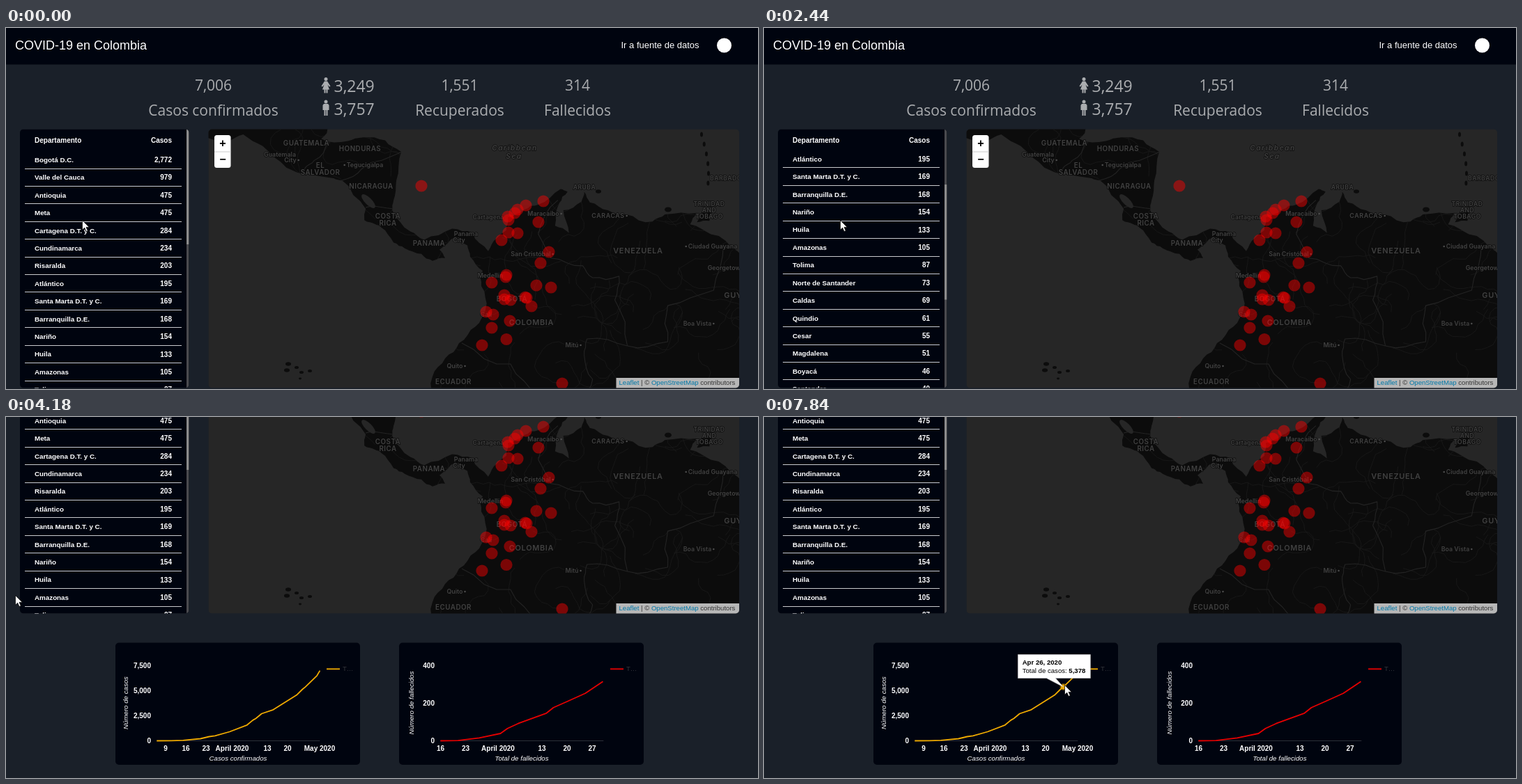
These frames come from a looping animation (1079 px wide and 519 px high, 8000 ms). An HTML page:

```html
<!DOCTYPE html>
<html lang="es">
<head>
<meta charset="utf-8">
<title>COVID-19 en Colombia</title>
<style>
  html, body { margin: 0; width: 100%; height: 100%; overflow: hidden; background: #1a2029; }
  svg { display: block; width: 1079px; height: 519px; }
  text { font-family: "Liberation Sans", Arial, sans-serif; white-space: pre; }
  .stat { font-family: "Open Sans", "Noto Sans", sans-serif; font-weight: 500; fill: #abadb0; }
  .place { font-family: Inter, Roboto, sans-serif; font-weight: 600; fill: #414141;
           stroke: #0c0c0c; stroke-width: 1.4px; paint-order: stroke; }
</style>
</head>
<body>
<svg id="stage" viewBox="0 0 1079 519"></svg>
<script>
const LOOP = 8000;
const stage = document.getElementById('stage');

function el(parent, tag, attrs = {}) {
  const node = document.createElementNS('http://www.w3.org/2000/svg', tag);
  for (const key in attrs) node.setAttribute(key, attrs[key]);
  parent.appendChild(node);
  return node;
}
const group = (parent, attrs) => el(parent, 'g', attrs);
const rect = (parent, x, y, width, height, fill, rx = 0) => el(parent, 'rect', { x, y, width, height, fill, rx });
const line = (parent, d, stroke, width = 1) =>
  el(parent, 'path', { d, fill: 'none', stroke, 'stroke-width': width, 'stroke-linejoin': 'round' });

// Text placed by the middle of its capitals.
function text(parent, x, y, str, size, attrs = {}) {
  const node = el(parent, 'text', { x, y: y + size * 0.36, 'font-size': size, fill: '#fff', ...attrs });
  node.textContent = str;
  return node;
}
const END = { 'text-anchor': 'end' }, MID = { 'text-anchor': 'middle' };
const BOLD = { 'font-weight': 700 };

function clip(id, x, y, width, height, rx) {
  const c = el(defs, 'clipPath', { id });
  rect(c, x, y, width, height, '#000', rx);
  return `url(#${id})`;
}

// Linear interpolation through [position, value] keys.
function track(keys, p) {
  const i = keys.findIndex(k => k[0] > p);
  if (i === 0) return keys[0][1];
  if (i < 0) return keys[keys.length - 1][1];
  const [p0, v0] = keys[i - 1], [p1, v1] = keys[i];
  return v0 + (v1 - v0) * (p - p0) / (p1 - p0);
}

let seed = 7;
const random = () => (seed = seed * 16807 % 2147483647) / 2147483647;

const defs = el(stage, 'defs');
rect(stage, 0, 0, 1079, 519, '#1a2029');
const page = group(stage);

// Header and totals
rect(page, 0, 0, 1079, 52.5, '#00040f');
text(page, 13, 24.5, 'COVID-19 en Colombia', 18);
text(page, 882.5, 24.5, 'Ir a fuente de datos', 13);
el(page, 'circle', { cx: 1030.5, cy: 25, r: 10.5, fill: '#fff' });

const stat = (x, y, str, size = 21, attrs = MID) => text(page, x, y, str, size, { class: 'stat', ...attrs });
[[297.5, '7,006', 'Casos confirmados'], [651, '1,551', 'Recuperados'], [820, '314', 'Fallecidos']]
  .forEach(([x, count, label]) => { stat(x, 82.5, count); stat(x, 118.5, label); });
stat(470.5, 84, '3,249', 23, {});
stat(470.5, 116.5, '3,757', 23, {});

function person(y, body) {
  const g = group(page, { transform: `translate(459 ${y})`, fill: '#abadb0' });
  el(g, 'circle', { r: 2.5 });
  el(g, 'path', { d: body });
  el(g, 'path', { d: 'M-2.5 10h2v10h-2zM.5 10h2v10h-2z' });
}
person(73.5, 'M-2 3H2L6.5 10 5 11 2.5 8 5 15H-5L-2.5 8-5 11-6.5 10Z');
person(106, 'M-3 3H3L4.5 5V12H-4.5V5Z');

// Table
const ROW = 25.42;
const cases = `Bogotá D.C.:2,772|Valle del Cauca:979|Antioquia:475|Meta:475|Cartagena D.T. y C.:284|Cundinamarca:234
Risaralda:203|Atlántico:195|Santa Marta D.T. y C.:169|Barranquilla D.E.:168|Nariño:154|Huila:133|Amazonas:105
Tolima:87|Norte de Santander:73|Caldas:69|Quindio:61|Cesar:55|Magdalena:51|Boyacá:46|Santander:40|Cauca:35
Buenaventura D.E.:34|Córdoba:29|Bolívar:24|Casanare:18|Chocó:13|La Guajira:7|San Andrés:6|Caquetá:5|Putumayo:4|Sucre:3`
  .split(/[|\n]/).map(s => s.split(':'));

const table = group(page, { 'clip-path': clip('tableBox', 20, 145.5, 242.5, 372, 5) });
rect(table, 20, 145.5, 242.5, 372, '#00040f');
const rowView = group(table, { 'clip-path': clip('rowBox', 20, 177, 239, 341, 0) });
const rows = group(rowView);
cases.forEach(([name, count], i) => {
  const y = 189.3 + i * ROW;
  text(rows, 41, y, name, 9.8, BOLD);
  text(rows, 238, y, count, 10, { ...BOLD, ...END });
  rect(rows, 27, Math.round(y + 12.2), 225, 1, '#c9cacd');
});
text(table, 41, 161.3, 'Departamento', 10, BOLD);
text(table, 238, 161.3, 'Casos', 10, { ...BOLD, ...END });
rect(table, 259, 145.5, 3.5, 372, '#4a4a4e');
const thumb = rect(table, 259, 145.5, 3.5, 165.5, '#8b8b8b');

// Map: points are west longitude and latitude in tenths of a degree
const DEG = 19.97;
function project([west, lat]) {
  const merc = Math.asinh(Math.tan(lat / 10 * Math.PI / 180)) * 180 / Math.PI;
  return [2227.6 - DEG * west / 10, 481 - DEG * merc];
}
const points = str => str.split(',').map(p => project(p.trim().split(' ').map(Number)));

// Adds shaken midpoints so that few points give a natural coast.
function rough(pts, depth = 2) {
  if (!depth) return pts;
  const out = [pts[0]];
  for (let i = 1; i < pts.length; i++) {
    const [x0, y0] = pts[i - 1], [x1, y1] = pts[i];
    const k = Math.hypot(x1 - x0, y1 - y0) < 90 ? (random() - 0.5) * 0.22 : 0;
    out.push([(x0 + x1) / 2 - (y1 - y0) * k, (y0 + y1) / 2 + (x1 - x0) * k], pts[i]);
  }
  return rough(out, depth - 1);
}
const shape = (...parts) =>
  'M' + rough(parts.flatMap(points)).map(([x, y]) => `${x.toFixed(1)} ${y.toFixed(1)}`).join('L');

const centralCaribbean = '985 172,883 168,889 159,870 157.5,859 160,843 158,831.5 150,835 130,837 116,838 109,825 94,815 88,795 96,780 93,769 80';
const southCaribbean = '763 89,756 95,755 104,743 109.5,733 113,717 124,712 122,718 114,721 98,711 93,715 109,702 115,700 122,696 114.5,683 109,670 106,651 101,642 106,619 107,624 99,609 92,590 80,575 65,575 -30';
const southPacific = '810 -30,809 -10,800 3,790 14,778 26,771 38,774 55,773 66,782 76,784 84';
const centralPacific = '793 90,804 81,800 75,809 73,817 78,829 82,837 86,846 97,850 99,858 102,857 110,874 130,880 131.5,914 139,931 154,945 162,957 157,970 159.5,985 162';
const trinidad = '619 100.5,610 101.5,609 108,616 107,619 100.5';
const borders = ['719 116,733 92,724 75,701 69.5,694 61,675 62,678 45,669 12', '669 12,698 17,700 5,694 -12,700 -30',
  '788 14,753 -1,731 -24', '669 12,640 15,640 41,607 52,600 85', '837 110,857 111', '831 150,860 138,874 130',
  '883 157,894 144,901 138'];

const map = group(page, { 'clip-path': clip('mapBox', 290.5, 145.5, 761.5, 372, 5) });
rect(map, 290.5, 145.5, 761.5, 372, '#262626');
const LAND = '#0c0c0c';
const land = shape(centralCaribbean, southCaribbean, southPacific, centralPacific) + 'Z';
el(el(defs, 'clipPath', { id: 'landBox' }), 'path', { d: land });
el(map, 'path', { d: land, fill: LAND });
el(map, 'path', { d: shape(trinidad) + 'Z', fill: LAND });

const islet = (cx, cy, rx, ry) => el(map, 'ellipse', { cx, cy, rx, ry, fill: LAND });
for (let i = 0; i < 6; i++) islet(998 + 10 * Math.sin(i / 2.6), 153 + i * 14, 2, 3.5);
[[405, 483, 4], [403, 492, 4], [417, 488, 3], [424, 495, 3], [436, 493, 3], [422, 504, 2], [950, 261, 5], [850, 235, 4]]
  .forEach(([x, y, r]) => islet(x, y, r, r * 0.7));

const ground = group(map, { 'clip-path': 'url(#landBox)' });
for (let i = 0; i < 95; i++) {
  let x = 340 + random() * 720, y = 145 + random() * 375, a = random() * 6.3, d = `M${x} ${y}`;
  for (let k = 0; k < 12; k++) {
    a += random() * 1.6 - 0.8;
    x += Math.cos(a) * 9;
    y += Math.sin(a) * 9;
    d += `L${x.toFixed(1)} ${y.toFixed(1)}`;
  }
  line(ground, d, '#191919', 0.9);
}
borders.forEach(b => line(ground, shape(b), '#232323', 1.1));
el(ground, 'ellipse', { rx: 13, ry: 5, transform: 'translate(520 249) rotate(45)', fill: '#262626' });

function places(size, spacing, list, attrs = {}) {
  return list.map(([x, y, str]) =>
    text(map, x, y, str, size, { class: 'place', ...MID, 'letter-spacing': spacing, ...attrs }));
}
places(9.8, 0.5, [[431, 165, 'GUATEMALA'], [508, 173, 'HONDURAS'], [451, 197, 'EL'], [451, 207, 'SALVADOR'],
  [524, 227, 'NICARAGUA'], [548, 270, 'COSTA'], [548, 280, 'RICA'], [607, 309, 'PANAMA'], [642, 508, 'ECUADOR'],
  [726, 389, 'BOGOTÁ']]);
places(10.9, 0.7, [[907, 320.5, 'VENEZUELA'], [754, 423, 'COLOMBIA'], [1056, 384, 'GUYANA']]);
places(8.6, 0.5, [[830, 229, 'ARUBA'], [1009, 253, 'TRINIDAD'], [1009, 262, 'AND'], [1009, 271, 'TOBAGO'],
  [1036, 216, 'BARBADOS']]);
places(10, 1.6, [[730, 172.5, 'Caribbean'], [729, 184, 'Sea']], { 'font-style': 'italic', stroke: 'none' });
places(8.9, 0, [[393, 181.5, 'Guatemala'], [660, 296, 'Panama'], [650, 305, 'City'], [692, 272, 'Cartagena'],
  [1033, 345, 'Georgetown'], [695, 356, 'Medellín'], [689, 411.5, 'Cali']]);

// Towns with a dot before (-1) or after (1) the name
function towns(side, spacing, list) {
  places(8.9, spacing, list).forEach((label, i) => {
    const cx = list[i][0] + side * (label.getComputedTextLength() / 2 + 3);
    el(map, 'circle', { cx, cy: list[i][1], r: 1.3, fill: '#4c4c4c' });
  });
}
towns(1, 0, [[408, 190, 'City'], [771, 267, 'Maracaibo'], [753, 325, 'San Cristóbal'], [992, 425, 'Boa Vista'],
  [812, 456, 'Mitú'], [644, 486, 'Quito']]);
towns(1, 0.6, [[864, 270, 'CARACAS']]);
towns(-1, 0, [[515, 197, 'Tegucigalpa'], [1014, 314, 'Ciudad Guayana']]);

[[596, 227], [771, 249], [746, 255], [734, 261], [730, 266], [720, 271], [721, 276], [721, 294], [734, 295], [711, 305],
 [764, 279], [779, 322], [767, 338], [718, 355], [717, 358], [697, 366], [761, 370], [782, 373], [715, 384], [715, 390],
 [724, 391], [745, 387], [747, 388], [754, 400], [689, 408], [699, 412], [723, 421], [697, 431], [718, 447.5], [683, 456],
 [798, 511]].forEach(([cx, cy]) => el(map, 'circle', { cx, cy, r: 8.6, fill: '#f00', opacity: 0.46 }));

rect(map, 299, 154, 23.5, 47, '#fff', 3.5);
rect(map, 299, 177.5, 23.5, 1, '#ccc');
text(map, 310.8, 165.5, '+', 16, { ...BOLD, ...MID, fill: '#000' });
text(map, 310.8, 188.5, '−', 16, { ...BOLD, ...MID, fill: '#000' });

rect(map, 875.5, 503, 177, 15, 'rgba(255,255,255,.7)');
const credit = text(map, 879.5, 510, '', 9.6);
[['Leaflet', '#0078a8'], [' | © ', '#333'], ['OpenStreetMap', '#0078a8'], [' contributors', '#333']]
  .forEach(([s, fill]) => { el(credit, 'tspan', { fill }).textContent = s; });

// Charts
const BASE = 465.5;
const confirmed = [[0, 1], [5, 9], [9, 45], [15, 210], [18, 419], [20, 491], [25, 906], [31, 1579], [33, 2054], [34, 2223],
  [36, 2709], [40, 3103], [48, 4561], [50, 5142], [51, 5378], [55, 6507], [56, 7006]];
const deaths = [[0, 0], [5, 1], [11, 15], [17, 39], [19, 66], [22, 92], [30, 147], [32, 177], [36, 210], [41, 253], [46, 316]];
const charts = group(page, { transform: 'translate(0 235)' });

function chart(left, color, values, pitch, unit, yLabels, xTicks, xTitle, yTitle, turnX) {
  rect(charts, left, 324.5, 351, 175.5, '#00040f', 5);
  yLabels.forEach((s, i) =>
    text(charts, left + 51, BASE - 107.7 * i / (yLabels.length - 1), s, 10, { ...BOLD, ...END }));
  xTicks.forEach(([x, s]) => text(charts, x, 476, s, 10, { ...BOLD, ...MID }));
  const x0 = left + 59.3;
  line(charts, `M${x0} ${BASE}h234`, '#2c2f38');
  const curve = values.map(([d, v]) => `${(x0 + d * pitch).toFixed(1)} ${(BASE - v * unit).toFixed(1)}`);
  line(charts, 'M' + curve.join('L'), color, 1.8);
  const italic = { ...MID, 'font-style': 'italic' };
  text(charts, left + 176, 490.3, xTitle, 9.7, italic);
  text(charts, 0, 0, yTitle, 9.7, { ...italic, transform: `translate(${turnX} 411) rotate(-90)` });
  line(charts, `M${left + 303} 362.3h19`, color, 1.8);
  text(charts, left + 326, 362, 'T…', 9.6, { fill: '#34363c' });
}
chart(157, '#f0ab00', confirmed, 4.18, 0.0144, ['0', '2,500', '5,000', '7,500'],
  [[229, '9'], [258, '16'], [287, '23'], [324.5, 'April 2020'], [375, '13'], [404, '20'], [450, 'May 2020']],
  'Casos confirmados', 'Número de casos', 171);
chart(564, '#e80000', deaths, 5.07, 0.27, ['0', '200', '400'],
  [[623.5, '16'], [659.5, '23'], [706, 'April 2020'], [769, '13'], [805, '20'], [841, '27']],
  'Total de fallecidos', 'Número de fallecidos', 581);

// Tooltip, drawn around the marked point
const tip = group(charts);
el(tip, 'circle', { r: 5, fill: '#f0ab00', opacity: 0.4 });
el(tip, 'circle', { r: 3.5, fill: '#f0ab00' });
const bubble = el(tip, 'path', { fill: '#fff', stroke: '#c4c4c4', 'stroke-width': 0.6 });
const tipDate = text(tip, 0, -35.7, '', 9.6, { ...BOLD, fill: '#000' });
const tipLine = text(tip, 0, -23.7, 'Total de casos: ', 9.6, { fill: '#000' });
const tipValue = el(tipLine, 'tspan', BOLD);

function showTip(day) {
  tip.setAttribute('visibility', day ? 'visible' : 'hidden');
  if (!day) return;
  const value = Math.round(track(confirmed, day)), wide = value > 999;
  const left = wide ? -65 : -60, width = wide ? 104 : 95.5;
  tip.setAttribute('transform', `translate(${216.2 + 4.18 * day} ${BASE - value * 0.0144})`);
  bubble.setAttribute('d', `M${left} -46.5h${width}v34H-11L0 0-24-12.5H${left}Z`);
  tipDate.setAttribute('x', left + 6.3);
  tipLine.setAttribute('x', left + 6.3);
  tipDate.textContent = (day < 26 ? `Mar ${day + 6}` : `Apr ${day - 25}`) + ', 2020';
  tipValue.textContent = value.toLocaleString('en-US');
}

const cursor = el(stage, 'path', { d: 'M.5.5V14.2L3.7 11.2 6 16.5 8.3 15.5 6 10.4H10.3Z',
  fill: '#fff', stroke: '#000', 'stroke-width': 0.7 });

// The screen refreshes in bursts: start, end, number of steps
const notches = [[400, 520, 2], [800, 920, 2], [1210, 1330, 2], [1470, 1620, 2]];
const bursts = [...notches, [2040, 2710, 6], [3140, 4180, 7], [4340, 5120, 7], [5390, 5930, 5], [6200, 7010, 7], [7580, 7840, 3]];
const ticks = [0, ...bursts.flatMap(([from, to, n]) =>
  Array.from({ length: n }, (_, i) => Math.floor(from + (to - from) * i / (n - 1))))];

const pointerX = [[2450, 109], [2710, 23], [3300, 13], [4180, 13], [5120, 290], [5930, 362], [6470, 393], [7010, 427], [7580, 428], [7840, 431]];
const pointerY = [[2450, 276], [2710, 260], [3300, 256], [4180, 256], [5120, 456], [5930, 427], [6470, 414], [7010, 391], [7580, 390], [7840, 385]];
const pageScroll = [[3313, 0], [3486, 32], [3660, 100], [3833, 109], [4006, 190], [4180, 235]];
const marked = [[5120, 18], [5930, 34], [6470, 40], [7010, 50], [7580, 50], [7710, 51]];

function listScroll(t) {
  if (t >= 2040) return Math.max(0, 358 * (2576 - t) / 536);
  return notches.reduce((sum, [from, to]) => sum + (t >= to ? 100 : t >= from ? 42 : 0), 0);
}

let shown = -1;
function draw() {
  const now = performance.now() % LOOP;
  const t = ticks.findLast(tick => tick <= now);
  if (t !== shown) {
    shown = t;
    const list = Math.round(listScroll(t));
    cursor.setAttribute('transform', `translate(${Math.round(track(pointerX, t))} ${Math.round(track(pointerY, t))})`);
    rows.setAttribute('transform', `translate(0 ${-list})`);
    thumb.setAttribute('y', 145.5 + list * 152 / 342);
    page.setAttribute('transform', `translate(0 ${-Math.round(track(pageScroll, t))})`);
    showTip(t < 5120 ? 0 : Math.round(track(marked, t)));
  }
  requestAnimationFrame(draw);
}
draw();
</script>
</body>
</html>
```
